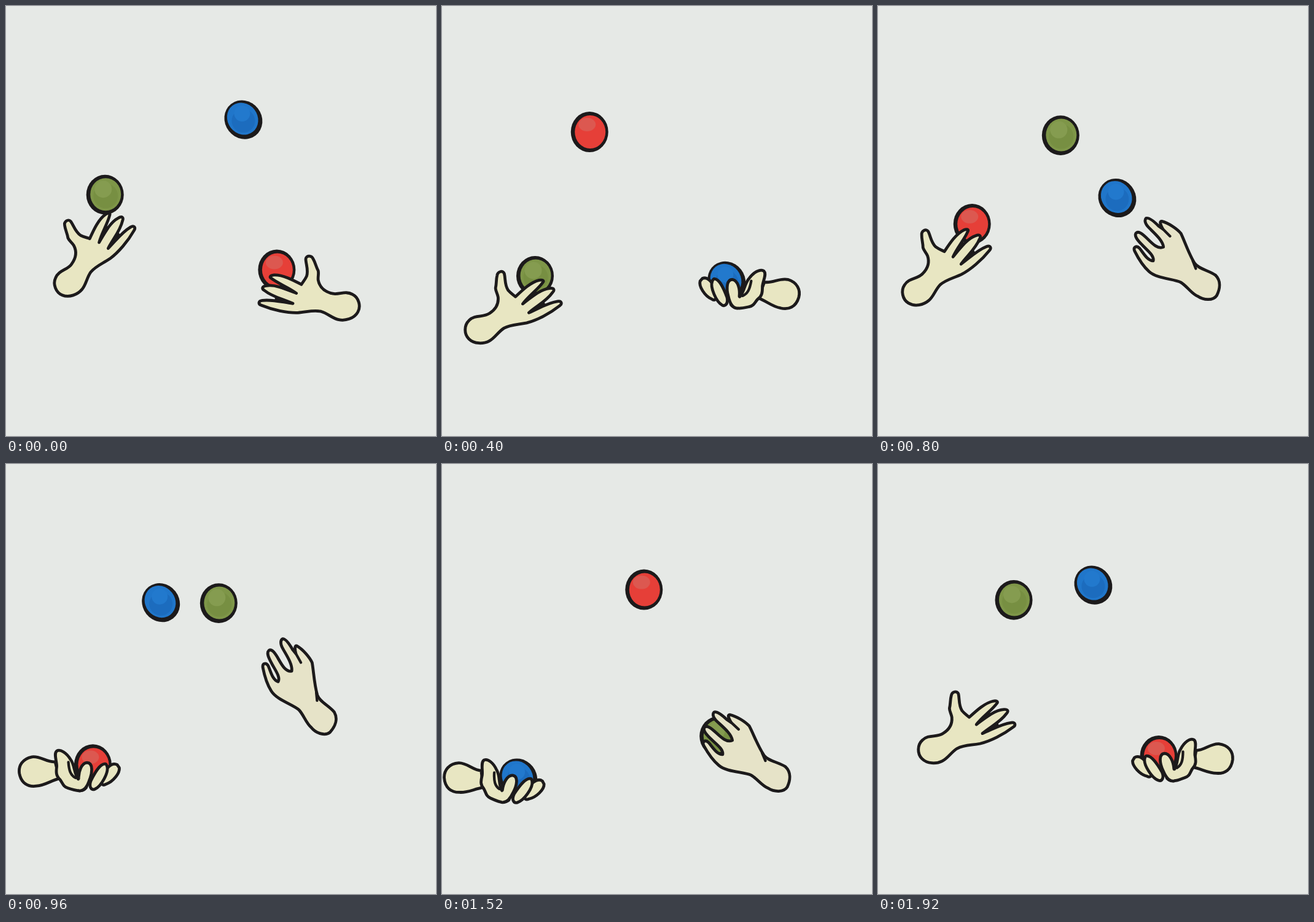
An HTML page that plays this animation: 700x700 px, repeating every 2000 ms.

```html
<!DOCTYPE html>
<html lang="en">
<head>
<meta charset="utf-8">
<title>Juggling hands</title>
<style>
  html, body { margin: 0; width: 100%; height: 100%; overflow: hidden; background: #e6e9e6; }
  svg { display: block; width: 100vw; height: 100vh; }
  .hand { stroke: #1c1a1b; stroke-linejoin: round; stroke-linecap: round; }
  .skin { fill: #e8e6c2; stroke-width: 4.9; }
  .palm-down { fill: #e6e3c8; }
  .line { fill: none; stroke-width: 4.4; }
  .wedge { fill: #1c1a1b; stroke-width: 2; }
  .rim { fill: #1c1a1b; }
</style>
</head>
<body>
<svg viewBox="0 0 700 700">
  <defs>
    <!-- Each hand is drawn around the centre of its wrist. -->
    <g id="open" class="hand">
      <path class="skin" d="M16-27C26-33 32-42 31-54C30-60 27-64 27-69C29-77 28-83 30-90C31-97 40-99 42-93C44-85 42-74 48-65C52-60 57-57 60-54C72-65 86-78 100-81C106-82 109-80 106-77C98-66 82-55 72-42C88-54 103-66 117-67C125-68 126-64 122-60C112-46 95-38 82-27C99-34 114-43 130-45C137-46 138-41 134-38C117-25 95-14 78-10C62-7 52-8 40-2C30 4 24 15 15 19C5 24-10 24-19 15C-27 7-27-8-18-16C-8-26 6-20 16-27Z"/>
      <path class="wedge" d="M71-41L93-64L95-57ZM81-26L107-45L109-39Z"/>
    </g>
    <g id="cup" class="hand">
      <path class="skin" d="M-139-2C-130-8-118 4-112 18C-108 28-112 32-118 29C-130 26-143 12-142 3Z"/>
      <path class="skin" d="M-119-5C-110-6-100 10-93 22C-89 32-93 38-99 36C-110 32-124 10-122 0Q-121-5-119-5Z"/>
      <path class="skin" d="M-36-14C-22-14-12-26 2-25C18-23 26-12 25 1C23 18 12 25-2 24C-16 24-26 17-41 14Z"/>
      <path class="skin" d="M-72 17C-66 8-68-8-62-16C-56-28-46-35-40-32C-34-28-39-15-38-6C-36 4-36 10-42 16C-46 22-46 28-54 31C-64 35-76 40-83 34C-90 30-80 20-72 17Z"/>
      <path class="line" d="M-58-12C-58 2-60 10-68 15"/>
      <path class="skin" d="M-73 17C-74 4-80-9-89-9C-99-8-97 8-91 20C-87 30-82 38-73 37"/>
    </g>
    <g id="back" class="hand">
      <path class="skin palm-down" d="M-70-104C-58-101-44-91-38-84C-32-72-25-50-15-34C-8-24 9-22 20-14C29-5 28 8 22 20C16 29 0 28-10 21C-21 16-28 4-38-2C-50-8-78-8-91-20C-101-29-109-42-115-54C-118-61-112-64-107-59C-101-52-94-38-84-38C-82-47-95-56-103-65C-110-72-116-79-113-84C-109-89-101-82-93-74C-85-66-76-57-67-61C-68-72-82-84-91-93C-98-100-99-106-96-109C-91-111-82-103-75-96L-68-91C-72-98-74-104-70-104Z"/>
      <path class="line" d="M-68-91L-56-79M-18-38L-13-25"/>
    </g>
  </defs>

  <g id="red">
    <ellipse class="rim" rx="30.5" ry="33"/>
    <ellipse cx="1" rx="25" ry="27" fill="#e63f38"/>
    <ellipse cx="-4" cy="-12" rx="14" ry="11" fill="#dc5850"/>
  </g>
  <g id="green">
    <ellipse class="rim" rx="30.5" ry="32.3"/>
    <ellipse cx="1" cy="-.5" rx="25" ry="26.5" fill="#7e9648"/>
    <circle cx="1" cy="2" r="20" fill="#778f42"/>
    <circle cx="-3" cy="-9" r="14" fill="#859c50"/>
  </g>
  <g id="blue">
    <ellipse class="rim" rx="32.5" ry="30" transform="rotate(52)"/>
    <ellipse cx="-2" rx="27" ry="24.3" fill="#2076ca" transform="rotate(52)"/>
    <circle cx="0" cy="2" r="19" fill="#1c6cbe"/>
    <circle cx="-2" cy="-10" r="13" fill="#2279cd"/>
  </g>

  <use id="left"/>
  <use id="right"/>
</svg>
<script>
const STEP = 80, COUNT = 25;   // ms per drawing, drawings per loop
const GRAVITY = 10;            // px per step squared
const GRIP = 1.5;              // steps to let go of a ball or close on it
const SIZE = 0.975;

// Every hand repeats one orbit three times per loop.
// starts: first step of each turn; orbit: share of the turn, wrist x, wrist y, tilt
const hands = {
  left: {
    starts: [0, COUNT / 3, COUNT * 2 / 3],
    orbit: [[0, 103, 450, -23], [.2, 64, 465, -14], [.28, 28, 511, -3], [.44, 46, 501, 4],
      [.53, 46, 551, 0], [.6, 62, 527, -1], [.8, 74, 480, -23], [.88, 90, 465, 0]],
    pose: u => u > .22 && u < .46 ? "cup" : "open",
    mirrored: "cup"
  },
  right: {
    starts: [0, 8, 18.5],
    orbit: [[0, 551, 489, 15], [.077, 540, 507, -2], [.19, 530, 452, 0], [.38, 512, 412, 15.5],
      [.625, 557, 469, 10], [.667, 554, 470, 2.5], [.846, 553, 480, 0]],
    pose: u => u < .05 || u > .93 ? "open" : u < .45 ? "back" : "cup",
    mirrored: "open"
  }
};

// Where a held ball lies, seen from the wrist
const hold = { open: [91, -86], cup: [-96, -5], back: [-88, -67] };

// rise: steps up to the top of the arc at (x, y); vx: speed there; bend: sideways slowing
const flights = [
  { ball: "red", to: "left", thrown: 0, time: 11.5, rise: 6, x: 214, y: 195, vx: -24, bend: 2.2 },
  { ball: "red", to: "right", thrown: 13.5, time: 10.5, rise: 4.9, x: 309, y: 201, vx: 33, bend: 0 },
  { ball: "green", to: "right", thrown: 5, time: 10, rise: 5.6, x: 312, y: 207, vx: 24.5, bend: 0 },
  { ball: "green", to: "left", thrown: 19, time: 6.6, rise: 3.8, x: 275, y: 207, vx: -45, bend: 0 },
  { ball: "blue", to: "left", thrown: 8.5, time: 8, rise: 4.67, x: 206, y: 212, vx: -28.7, bend: 9.2 },
  { ball: "blue", to: "right", thrown: 21, time: 9, rise: 4.1, x: 390, y: 185, vx: 36, bend: 0 }
];

const mod = (a, n) => (a % n + n) % n;
const mix = (p, q, w) => p.map((v, i) => v + (q[i] - v) * w);
const smooth = v => {
  const u = Math.min(1, Math.max(0, v));
  return u * u * (3 - 2 * u);
};

// Smooth closed curve through the orbit; column 0 is the share of the turn.
function sample(orbit, u, column) {
  const n = orbit.length;
  const at = i => {
    const turn = Math.floor(i / n), key = orbit[i - turn * n];
    return [key[0] + turn, key[column]];
  };
  const i = orbit.findLastIndex(key => key[0] <= u);
  const [a, b, c, d] = [at(i - 1), at(i), at(i + 1), at(i + 2)];
  const span = c[0] - b[0], s = (u - b[0]) / span, diff = c[1] - b[1];
  const slopeB = (c[1] - a[1]) / (c[0] - a[0]) * span;
  const slopeC = (d[1] - b[1]) / (d[0] - b[0]) * span;
  return b[1] + s * (slopeB + s * (3 * diff - 2 * slopeB - slopeC + s * (slopeB + slopeC - 2 * diff)));
}

function handAt(name, step) {
  const { starts, orbit, pose, mirrored } = hands[name];
  const turn = starts.findLastIndex(start => start <= step);
  const end = starts[turn + 1] ?? COUNT;
  const u = (step - starts[turn]) / (end - starts[turn]);
  const [x, y, tilt] = [1, 2, 3].map(column => sample(orbit, u, column));
  const shape = pose(u), side = shape === mirrored ? -1 : 1;
  const [hx, hy] = hold[shape], r = tilt * Math.PI / 180;
  return {
    shape,
    transform: `translate(${x} ${y}) scale(${side * SIZE} ${SIZE}) rotate(${tilt})`,
    grip: [x + side * (hx * Math.cos(r) - hy * Math.sin(r)), y + hx * Math.sin(r) + hy * Math.cos(r)]
  };
}

// Follow the latest throw: leave one hand, fly the arc, settle in the other.
function ballAt(ball, step, pose) {
  const since = flight => mod(step - flight.thrown, COUNT);
  const flight = flights.filter(f => f.ball === ball).sort((a, b) => since(a) - since(b))[0];
  const s = since(flight), t = s - flight.rise;
  const arc = [flight.x + flight.vx * t + flight.bend * t * t, flight.y + GRAVITY * t * t];
  const from = flight.to === "left" ? "right" : "left";
  const leaving = mix(pose[from].grip, arc, smooth(s / GRIP));
  return mix(leaving, pose[flight.to].grip, smooth((s - flight.time) / GRIP + 1));
}

const el = id => document.getElementById(id);

function draw(step) {
  const pose = { left: handAt("left", step), right: handAt("right", step) };
  for (const name in pose) {
    el(name).setAttribute("href", "#" + pose[name].shape);
    el(name).setAttribute("transform", pose[name].transform);
  }
  for (const ball of ["red", "green", "blue"]) {
    el(ball).setAttribute("transform", `translate(${ballAt(ball, step, pose)})`);
  }
}

let start, shown = -1;
function tick(now) {
  start ??= now;
  const step = Math.floor((now - start) / STEP) % COUNT;
  if (step !== shown) draw(shown = step);
  requestAnimationFrame(tick);
}
draw(0);
requestAnimationFrame(tick);
</script>
</body>
</html>
```
